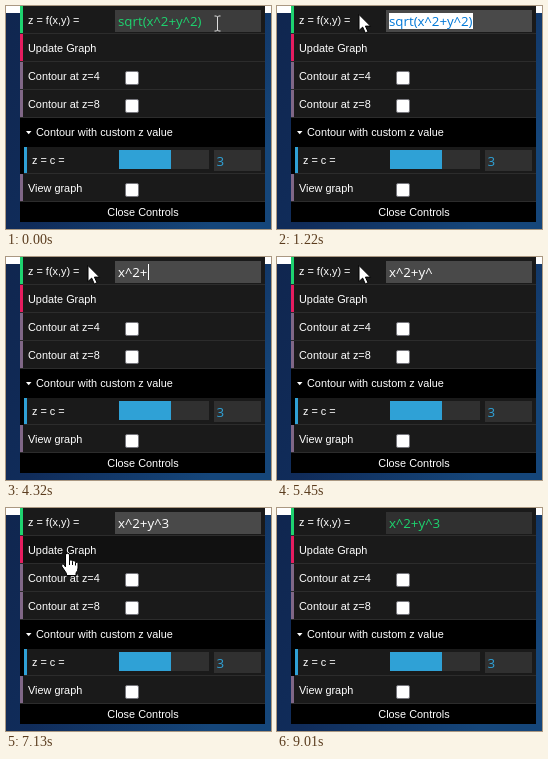
These frames come from a looping animation (265x223 px, 9.6 s). An HTML page:

```html
<!DOCTYPE html>
<html lang="en">
<head>
<meta charset="utf-8">
<title>Graph controls</title>
<style>
html, body { margin: 0; width: 100%; height: 100%; overflow: hidden; background: #10264f; }
svg { display: block; width: 265px; height: 223px; }
text { font: 10.9px "Liberation Sans", Arial, sans-serif; fill: #fff; white-space: pre; }
.value { font: 13.33px "Open Sans", "Noto Sans", sans-serif; }
.pointer { fill: #fff; stroke: #000; stroke-linejoin: round; }
</style>
</head>
<body>
<svg viewBox="0 0 265 223">
  <defs>
    <linearGradient id="navy" x2="1" y2=".6">
      <stop offset="0" stop-color="#10264f"/>
      <stop offset=".5" stop-color="#102c5a"/>
      <stop offset="1" stop-color="#15467a"/>
    </linearGradient>
    <clipPath id="clip"><rect id="clipBox" y="7" height="16"/></clipPath>
  </defs>
  <rect width="265" height="223" fill="url(#navy)"/>
  <rect width="265" height="7" fill="#fff"/>
  <g id="panel"></g>

  <rect id="field" x="109" y="4" width="146" height="22"/>
  <text id="formula" class="value" x="112" y="20"></text>
  <rect id="selection" y="7" height="16" fill="#fff"/>
  <text id="selected" class="value" x="112" y="20" clip-path="url(#clip)" style="fill:#0078d7">sqrt(x^2+y^2)</text>
  <rect id="caret" y="7" width="1" height="16" fill="#fff"/>

  <circle id="ring" r="10.5" fill="#ff0" fill-opacity=".47"/>
  <g id="cursor">
    <path id="beam" d="M-3-7.5H-1L0-6.5L1-7.5H3M0-6.5V6.5M-3 7.5H-1L0 6.5L1 7.5H3" fill="none" stroke="#ddd"/>
    <path id="arrow" class="pointer" d="M0 0V16L3.7 12.6L6.3 18.4L9 17.2L6.4 11.6H11.5Z"/>
    <g id="hand">
      <path class="pointer" d="M-2 13V1Q-2-.8 0-.8T2 1V7Q2 5.8 3.5 5.8T5 7.5Q5.4 6.4 6.7 6.7T8 8.5Q9.8 7.6 10.5 9.5V14Q10.5 16.5 8.5 19V21.5H-1V19.5L-5.6 12.5Q-6.3 10.7-5 10T-2 13Z"/>
      <path d="M2 7V11M5 8V11M8 9V11.5" stroke="#000"/>
    </g>
  </g>
</svg>
<script>
const $ = id => document.getElementById(id);
const set = (id, attrs) => { for (const k in attrs) $(id).setAttribute(k, attrs[k]); };
const rect = (x, y, w, h, fill, more = "") =>
  `<rect x="${x}" y="${y}" width="${w}" height="${h}" fill="${fill}" ${more}/>`;
const label = (x, y, text, more = "") => `<text x="${x}" y="${y}" ${more}>${text}</text>`;
const checkbox = y => rect(119.5, y + 9.5, 13, 13, "#fff", 'rx="1.5" stroke="#76767c"');

// y, label, accent colour, left indent
const rows = [
  [0, "z = f(x,y) =", "#1ed36f", 0],
  [28, "Update Graph", "#e61d5f", 0],
  [56, "Contour at z=4", "#806787", 0],
  [84, "Contour at z=8", "#806787", 0],
  [140, "z = c =", "#2fa1d6", 4],
  [168, "View graph", "#806787", 0]
];
$("panel").innerHTML = rect(14, 0, 245, 216, "#000") +
  rows.map(([y, name, accent, indent], i) =>
    rect(14 + indent, y, 245 - indent, 28, "#1a1a1a", `id="row${i}"`) +
    rect(14 + indent, y + 27, 245 - indent, 1, "#2c2c2c") +
    rect(14 + indent, y, 3, 27, accent) +
    label(22 + indent, y + 18, name)).join("") +
  [56, 84, 168].map(checkbox).join("") +
  rect(14, 140, 245, 1, "#000") +
  '<path d="M20 125H25.5L22.7 128.3Z" fill="#fff"/>' +
  label(30, 130, "Contour with custom z value") +
  rect(113, 144, 90, 19, "#303030") + rect(113, 144, 52, 19, "#2fa1d6") +
  rect(208, 144, 47, 21, "#303030") +
  label(210.5, 160, "3", 'class="value" style="fill:#2fa1d6"') +
  rect(14, 196, 245, 20, "#000", 'id="close"') +
  label(137, 210, "Close Controls", 'text-anchor="middle"');

// time, kind, x, y, button held
const moves = [
  [0, "beam", 211.5, 17.5, 0], [530, "beam", 210.5, 17.5, 1],
  [680, "beam", 150.5, 9.5, 1], [830, "beam", 112.5, 10.5, 1],
  [950, "beam", 87.5, 12.5, 1], [1100, "beam", 87.5, 12.5, 0],
  [1220, "arrow", 82, 8.5, 0], [6470, "arrow", 71, 24.5, 0],
  [6620, "hand", 60, 40, 0], [6740, "hand", 55.5, 49, 0],
  [6860, "hand", 57, 51.5, 0], [6980, "hand", 61.5, 46, 0],
  [7540, "hand", 61.5, 46, 1], [7690, "hand", 61.5, 46, 0],
  [8620, "hand", 73, 51.5, 0], [8740, "hand", 146, 125.5, 0],
  [8890, "hand", 190, 193, 0], [9010, "none", 0, 0, 0]
];
// time, typed characters, caret x (0 = hidden)
const typing = [
  [2880, 1, 118], [3280, 1, 0], [3430, 2, 127], [3740, 3, 134], [3890, 3, 0],
  [4320, 4, 142], [4470, 4, 0], [4740, 5, 148], [4860, 5, 0], [5450, 6, 0],
  [5880, 7, 164], [6000, 7, 0], [6470, 7, 164], [7130, 7, 0]
];
const at = (list, t) => list.filter(step => step[0] <= t).pop();
const show = (id, on) => $(id).style.display = on ? "" : "none";

function draw(t) {
  const [, kind, x, y, held] = at(moves, t);
  for (const id of ["beam", "arrow", "hand"]) show(id, id === kind);
  set("cursor", { transform: `translate(${x} ${y})` });
  show("ring", held);
  set("ring", { cx: x, cy: y });

  const [, count, caret] = at(typing, t) || [0, 0, 0];
  $("formula").textContent = count ? "x^2+y^3".slice(0, count) : "sqrt(x^2+y^2)";
  $("formula").style.fill = t >= 680 && t < 7540 ? "#fff" : "#1ed36f";
  set("field", { fill: t < 530 ? "#3c3c3c" : t < 7540 ? "#494949" : "#303030" });
  show("caret", caret);
  set("caret", { x: caret });

  const selecting = t >= 680 && t < 2880;
  const left = selecting ? t < 830 ? 150 : 112 : 196;
  for (const id of ["selection", "clipBox"]) set(id, { x: left, width: 196 - left });
  show("selected", selecting);

  set("row1", { fill: t >= 6620 && t < 8740 ? "#111" : "#1a1a1a" });
  set("close", { fill: t >= 8890 && t < 9010 ? "#111" : "#000" });
}

const start = performance.now();
function tick() {
  draw((performance.now() - start) % 9600);
  requestAnimationFrame(tick);
}
tick();
</script>
</body>
</html>
```
